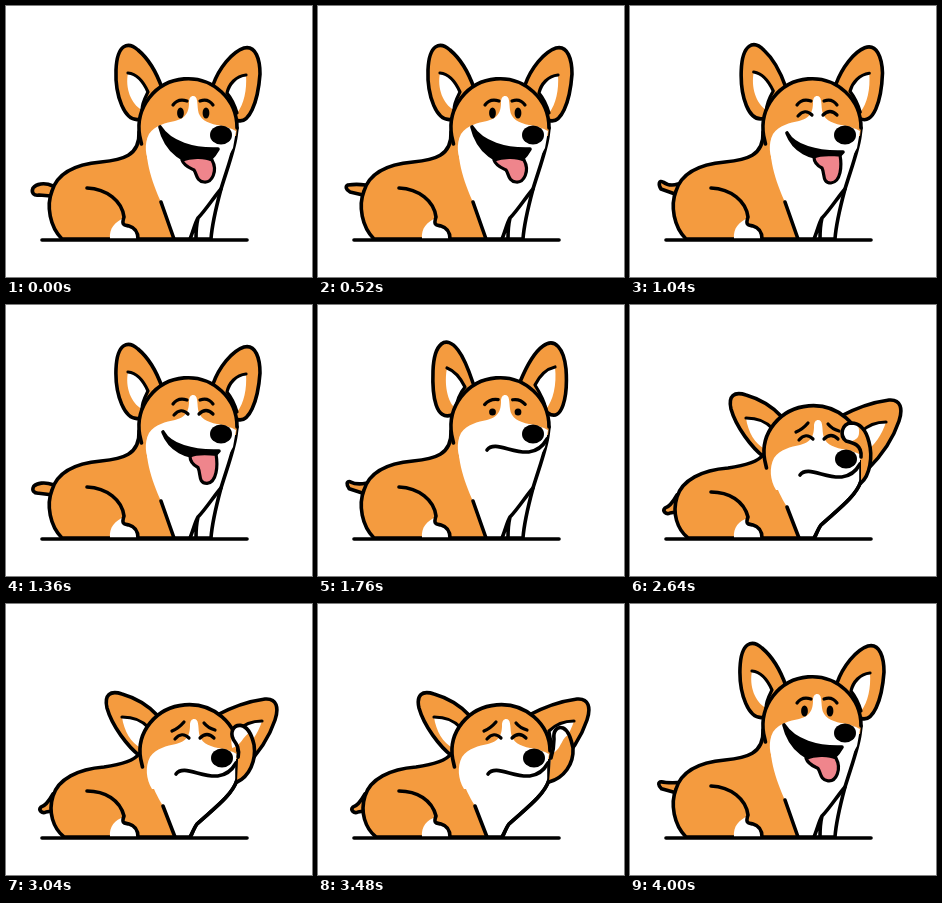
Animation of 306x271 px, one loop 4040 ms. Source, as an HTML page:

```html
<!DOCTYPE html>
<html lang="en">
<head>
<meta charset="utf-8">
<title>Corgi</title>
<style>
  html, body { margin: 0; width: 100%; height: 100%; overflow: hidden; background: #fff; }
  svg { display: block; width: 306px; height: 271px; }
  path { fill: none; stroke: none; stroke-width: 3.6; stroke-linecap: round; stroke-linejoin: round; }
  .line { stroke: #000; }
  .orange { fill: #f49b3f; }
  .white { fill: #fff; }
  .black { fill: #000; }
  .pink { fill: #ef858c; }
  .thin { stroke-width: 3.2; }
</style>
</head>
<body>
<svg viewBox="0 0 306 271">
  <path id="tail" class="orange line"/>
  <path id="earL" class="orange line"/>
  <path id="innerL" class="white"/>
  <path id="foldL" class="line thin"/>
  <path id="earR" class="orange line"/>
  <path id="innerR" class="white"/>
  <path id="foldR" class="line thin"/>
  <path id="body" class="orange"/>
  <path id="chest" class="white"/>
  <path id="bodyLine" class="line"/>
  <path id="chestLine" class="line"/>
  <path id="legLine" class="line"/>
  <path id="foot" class="white"/>
  <path id="thigh" class="line"/>
  <g id="head">
    <path id="skull" class="orange"/>
    <path class="white" d="M187 90C192 90 191 97 192 104C193 113 201 117 211 119C220 120 226 123 230 125L227 142C222 152 216 158 208 160L145 160C139 150 138 138 143 128C149 119 160 117 169 115C182 112 183 103 183 96C183 92 185 90 187 90Z"/>
    <path id="skullLine" class="line"/>
    <path id="mouth" class="black line"/>
    <path id="tongue" class="pink line thin"/>
    <path id="browL" class="line thin"/>
    <path id="browR" class="line thin"/>
    <g id="open">
      <ellipse cx="174.5" cy="107" rx="3.4"/>
      <ellipse cx="200" cy="107" rx="3.4"/>
    </g>
    <path id="shut" class="line thin" d="M168 110Q175 102 182 109M193 109Q200 102 207 109"/>
    <ellipse cx="215" cy="129" rx="11" ry="9.5"/>
  </g>
  <g id="arm">
    <path id="paw" class="orange"/>
    <path id="tip" class="white"/>
    <path id="pawLine" class="line"/>
  </g>
  <path class="line" d="M36 234H241"/>
</svg>
<script>
const LOOP = 4040, STEP = 40;
const $ = id => document.getElementById(id);
const set = (id, d) => $(id).setAttribute('d', d);

// Blend two paths that share the same commands.
function mix(a, b, k) {
  const to = b.match(/-?[\d.]+/g);
  let i = 0;
  return a.replace(/-?[\d.]+/g, n => (+n + (to[i++] - n) * k).toFixed(2));
}

// Eased value of a [time, value] track.
function track(keys, t) {
  let prev = keys[0];
  for (const key of keys) {
    if (t < key[0]) {
      const p = (t - prev[0]) / (key[0] - prev[0]);
      return prev[1] + (key[1] - prev[1]) * p * p * (3 - 2 * p);
    }
    prev = key;
  }
  return prev[1];
}

const tracks = {
  crouch: [[0, 0], [1440, 0], [1680, -.13], [1760, 0], [1920, .93], [2040, .9], [2280, 1], [3520, 1], [3720, -.06], [3840, 0]],
  perk: [[0, 0], [560, 0], [800, -.5], [1040, .25], [1240, 0], [1440, 0], [1690, 2.2], [1760, 1], [1900, 0], [3600, 0], [3720, .6], [3880, 0]],
  smile: [[0, 0], [600, 0], [720, 1], [1400, 1], [1640, 2], [3560, 2], [3740, 0]],
  shut: [[0, 0], [600, 0], [720, 1], [1360, 1], [1480, 0], [1680, 0], [1760, .35], [2240, .3], [2320, 1], [3520, 1], [3640, 0]],
  worry: [[0, 0], [1640, 0], [1760, .2], [1960, 1], [3520, 1], [3720, 0]],
  rub: [[0, 0], [2280, 0], [2440, 1], [2540, .5], [2640, 1], [2780, .4], [2920, 1], [3060, .4], [3200, 1], [3400, 0]]
};

// Upright and crouched shapes.
const shapes = {
  body: ['M133 126C134 150 116 154 95 156C72 158 52 165 46 185C40 200 44 221 56 233L205 233C206 218 211 198 215 183C222 160 228 145 230 130L231 122',
         'M133 150C127 158 112 161 98 163C72 165 52 175 47 192C42 208 47 224 58 233L184 233C186 230 188 224 191 220C206 206 226 192 231 176L231 146'],
  chest: ['M143 128C136 148 146 176 155 196L168 233L205 233C206 218 211 198 215 183C222 160 228 145 230 130L231 122Z',
          'M146 152C139 172 149 188 157 202L169 233L184 233C186 230 188 224 191 220C206 206 226 192 231 176L231 146Z'],
  chestLine: ['M215 183C208 191 199 205 192 212C189 217 187 226 184 233M192 212C190 220 190 227 190 233',
              'M231 176C226 192 206 206 191 220C188 224 186 230 184 233M191 220C188 224 186 230 185 232'],
  legLine: ['M155 196L168 233', 'M157 202L169 233'],
  foot: ['M104 233C103 222 109 216 118 212C115 220 119 219 123 220C130 222 132 227 132 233Z',
         'M104 233C103 222 109 216 118 213C115 220 119 219 123 220C130 222 132 227 132 233Z'],
  thigh: ['M81 182C101 183 116 195 118 211C115 220 119 219 123 220C130 222 132 227 132 233',
          'M81 187C99 187 114 196 118 212C115 220 119 219 123 220C130 222 132 227 132 233']
};

// Ears: relaxed, perked, drooping.
const ears = {
  earL: ['M135 113C118 118 109 88 110 64C111 38 122 35 132 44C144 54 151 68 156 82',
         'M134 110C118 116 114 92 115 66C116 38 128 29 140 45C147 54 151 66 155 78',
         'M134 152C122 143 106 122 101 104C98 91 104 86 116 90C130 94 143 102 152 112'],
  innerL: ['M122 67C119 82 125 98 136 104C136 97 139 92 142 86C138 77 132 68 122 67',
           'M129 63C126 78 129 97 138 104C139 94 142 88 147 82C143 74 137 66 129 63',
           'M116 113C118 127 125 139 135 144C136 134 139 129 143 124C136 116 127 113 116 113'],
  foldL: ['M122 67C132 68 138 77 142 86C139 92 136 97 136 104',
          'M129 63C137 66 143 74 147 82C142 88 139 94 138 104',
          'M116 113C127 113 136 116 143 124C139 129 136 134 135 144'],
  earR: ['M207 79C213 62 226 46 238 42C250 39 254 54 254 68C252 96 243 120 230 114',
         'M202 77C209 60 218 46 225 41C237 32 246 44 248 64C250 92 244 118 230 108',
         'M209 112C224 104 244 97 259 95C271 94 273 104 269 116C263 134 252 150 238 164'],
  innerR: ['M240 69C230 70 223 78 221 87C226 93 229 100 231 107C238 98 241 84 240 69',
           'M237 62C228 64 221 72 217 80C222 88 226 95 228 104C235 96 239 80 237 62',
           'M256 117C247 117 238 120 231 127C232 134 233 140 236 146C244 141 252 130 256 117'],
  foldR: ['M240 69C230 70 223 78 221 87C226 93 229 100 231 107',
          'M237 62C228 64 221 72 217 80C222 88 226 95 228 104',
          'M256 117C247 117 238 120 231 127C232 134 233 140 236 146']
};

// Laughing, smiling, sad.
const mouths = ['M154 121C164 137 188 144 212 143C208 150 204 155 198 156C180 160 160 146 154 121',
                'M157 127C164 140 186 147 213 146C210 150 206 152 200 152C180 153 164 145 157 127',
                'M169 145C179 131 212 164 229 134C229 134 229 134 229 134C212 164 179 131 169 145'];
const tongues = ['M176 154C186 150 200 151 206 154C212 165 206 177 198 176C190 175 191 168 188 164C184 162 178 160 176 154',
                 'M184 151C192 147 203 149 210 149C212 160 211 176 201 177C192 177 195 168 192 162C188 160 184 156 184 151',
                 'M190 146C194 146 198 146 202 145C203 146 202 147 200 147C197 147 196 147 195 147C193 147 191 147 190 146'];
const brows = {
  browL: ['M167 99Q172 92 181 95', 'M165 102Q172 99 177 93'],
  browR: ['M194 95Q202 92 207 99', 'M197 94Q201 99 208 101']
};

// Paw beside the cheek, paw over the eye.
const arm = {
  paw: ['M231 178C246 174 256 160 255 144C253 130 246 122 239 125C233 129 236 142 233 154',
        'M231 178C240 170 243 152 239 137C236 125 230 118 221 118C212 119 209 130 216 136C224 138 232 140 231 152'],
  tip: ['M234 150C236 142 233 129 239 125C244 122 249 125 252 131C243 132 245 144 234 150',
        'M216 136C210 131 213 120 221 119C226 119 230 121 229 128C229 134 223 137 216 136']
};
arm.paw[0] = 'M231 178C246 174 256 160 255 144C253 134 250 126 245 124C239 122 235 127 236 135C236 142 235 148 233 154';

const tails = ['M47 180C38 176 30 178 27 182C25 187 28 190 33 189L45 190',
               'M48 178C42 180 37 179 33 176C29 174 28 178 31 183L45 188',
               'M47 190C43 197 39 202 35 203C32 206 36 210 40 208L46 207'];

const mix3 = (list, v) => v < 1 ? mix(list[0], list[1], v) : mix(list[1], list[2], v - 1);

function draw(t) {
  const v = {};
  for (const name in tracks) v[name] = track(tracks[name], t);
  const k = v.crouch;

  for (const id in shapes) set(id, mix(...shapes[id], k));
  set('bodyLine', mix(...shapes.body, k));
  for (const id in ears) {
    const [rest, up, low] = ears[id];
    set(id, mix(mix(rest, up, v.perk), low, k));
  }
  for (const id in brows) set(id, mix(...brows[id], v.worry));

  const wag = Math.sin(Math.PI * t / 231) ** 2;
  set('tail', mix(mix(tails[0], tails[1], wag), tails[2], k));

  // The skull flattens a little as the head sinks.
  const dome = `M133.7 130A49 ${49 - 2.5 * k} 0 1 1 231 122`;
  set('skull', dome + 'L230 130Z');
  set('skullLine', dome + 'M133.7 130L135.5 138');
  $('head').setAttribute('transform', `translate(${k} ${25 * k})`);
  set('mouth', mix3(mouths, v.smile));
  set('tongue', mix3(tongues, v.smile));
  $('tongue').style.display = v.smile > 1.85 ? 'none' : '';
  const pant = 1 + .05 * Math.sin(t * Math.PI / 130);
  $('tongue').setAttribute('transform', `translate(0 150) scale(1 ${pant}) translate(0 -150)`);

  const closed = v.shut > .7;
  $('open').style.display = closed ? 'none' : '';
  $('shut').style.display = closed ? '' : 'none';
  for (const eye of $('open').children) eye.setAttribute('ry', 5.5 * (1 - v.shut));

  $('arm').style.display = k > .5 ? '' : 'none';
  $('arm').setAttribute('transform', `translate(0 ${Math.max(0, .9 - k) * 30})`);
  for (const id in arm) set(id, mix(...arm[id], v.rub));
  set('pawLine', mix(...arm.paw, v.rub));
}

const start = performance.now();
function tick() {
  const t = (performance.now() - start) % LOOP;
  draw(Math.floor(t / STEP) * STEP);
  requestAnimationFrame(tick);
}
tick();
</script>
</body>
</html>
```
